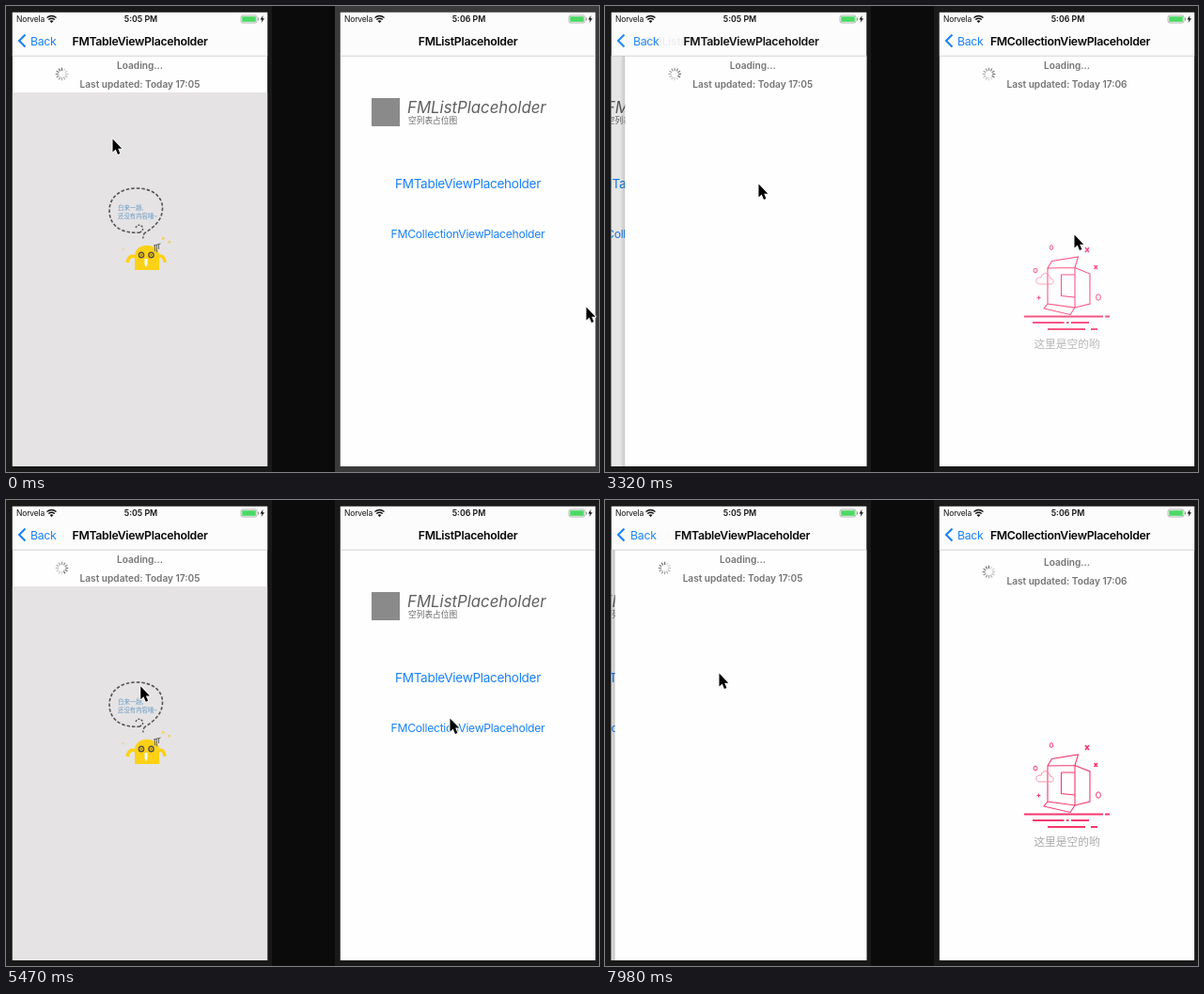
Recreate the animation shown at these times as an HTML page with a canvas. Size 631 px wide and 496 px high, loop 8 s.

```html
<!DOCTYPE html>
<html lang="en">
<head>
<meta charset="utf-8">
<title>List placeholder demo</title>
<style>
html, body { margin: 0; width: 631px; height: 496px; overflow: hidden; background: #0b0b0b; }
canvas { display: block; }
</style>
</head>
<body>
<canvas id="stage" width="631" height="496"></canvas>
<script>
const ctx = document.getElementById('stage').getContext('2d');
const LOOP = 8000, LEFT = 6.5, TOP = 6.5, WIDTH = 272, BOTTOM = 490, NAV = 53, MID = 142.5, HEADER = 39;
const BLUE = '#1a82f7', PINK = '#f5386e', PAGE = '#fefefe';
const SANS = 'Inter, sans-serif', CJK = '"Noto Sans CJK SC", "Noto Sans CJK", sans-serif';

const rowsA = 'b5e324 f58634 6f57ec b611dd 5ede85 a57890 20c8aa a481de 460008 5467c6 e9a038'.split(' ');
const rowsB = '52ec8b 6a1f62 7f2cf0 70f26a 31e46c 20204e 65bdff 958ef8 428ec8 d717e6 3fa58c'.split(' ');
const cells = '7f263b a7f5ec 67214b 214542 f3c215 4c1f6c 69386b fcff22'.split(' ');

const clamp = u => Math.max(0, Math.min(1, u));
const easeOut = u => 1 - (1 - u) ** 3;
const easeInOut = u => u < .5 ? 4 * u ** 3 : 1 - (2 - 2 * u) ** 3 / 2;

// Eased value of [time, value] keys
function track(keys, t, k = 1) {
  const i = keys.findIndex(key => key[0] > t);
  if (i === 0) return keys[0][k];
  if (i < 0) return keys[keys.length - 1][k];
  const a = keys[i - 1], b = keys[i];
  return a[k] + (b[k] - a[k]) * easeInOut((t - a[0]) / (b[0] - a[0]));
}
const latest = (steps, t) => steps.filter(s => s[0] <= t).pop()[1];

const phones = [
  {
    x: 0, time: '5:05 PM', updated: '17:05', title: 'FMTableViewPlaceholder', titleX: MID, button: 0,
    slides: [[-999, 1], [1120, 0], [3010, 1], [6800, 0], [7604, 1]],
    content: [[0, 'sad'], [400, rowsA], [3010, ''], [4200, 'sad'], [5960, rowsB], [7604, '']],
    pull: [[400, 39], [800, 0], [3009, 0], [3010, 39], [4200, 39], [4600, 0], [4880, 0], [5150, 39],
      [5960, 39], [6360, 0], [7603, 0], [7604, 39]],
    dim: [[4750, 1], [4830, .5], [4900, .5], [5150, 1]],
    cursor: [[0, 113, 141], [250, 113, 141], [950, 42, 30], [1300, 42, 30], [1660, 40, 58], [1850, 189, 433],
      [2150, 196, 478], [2500, 180, 478], [2900, 152, 190], [3320, 163, 189], [4200, 150, 195],
      [4830, 143, 200], [5300, 143, 198], [6160, 135, 188], [6650, 42, 30], [6950, 42, 30],
      [7500, 124, 185], [7980, 121, 184]]
  },
  {
    x: 349, time: '5:06 PM', updated: '17:06', title: 'FMCollectionViewPlaceholder', titleX: 146, button: 1,
    slides: [[-999, 0], [1002, 1], [4890, 0], [5772, 1]],
    content: [[0, ''], [2250, 'box'], [4100, 'grid'], [5772, ''], [6970, 'box']],
    pull: [[0, 39], [2250, 39], [2650, 0], [3000, 0], [3270, 39], [4100, 39], [4500, 0], [5771, 0], [5772, 39],
      [6970, 39], [7370, 0], [7480, 0], [7820, 52], [8100, 39]],
    dim: [[2900, 1], [2980, .5], [3150, .5], [3450, 1]],
    cursor: [[0, 617, 320], [150, 617, 320], [900, 503, 250], [1150, 503, 250], [1850, 592, 311], [2250, 590, 310],
      [2850, 499, 243], [3700, 499, 243], [4550, 375, 36], [5000, 375, 36], [5600, 476, 240],
      [6160, 472, 240], [7450, 478, 246], [7850, 480, 290]],
    hide: 7900
  }
];

function text(str, x, y, size, color, { weight = 400, align = 'center', track = 0, family = SANS, style = '' } = {}) {
  ctx.font = `${style} ${weight} ${size}px ${family}`;
  ctx.letterSpacing = track * size + 'px';
  ctx.textAlign = align;
  ctx.textBaseline = 'alphabetic';
  ctx.fillStyle = color;
  ctx.fillText(str, x, y);
}

function rect(x, y, w, h, color) {
  ctx.fillStyle = color;
  ctx.fillRect(x, y, w, h);
}

function stroke(d, color, width = 1) {
  ctx.strokeStyle = color;
  ctx.lineWidth = width;
  ctx.stroke(new Path2D(d));
}

function fill(d, color) {
  ctx.fillStyle = color;
  ctx.fill(new Path2D(d));
}

function ring(x, y, rx, ry, color, width = 1) {
  ctx.beginPath();
  ctx.ellipse(x, y, rx, ry, 0, 0, 7);
  ctx.strokeStyle = color;
  ctx.lineWidth = width;
  ctx.stroke();
}

function faded(alpha, draw) {
  ctx.save();
  ctx.globalAlpha *= alpha;
  draw();
  ctx.restore();
}

function shifted(x, y, draw) {
  ctx.save();
  ctx.translate(x, y);
  draw();
  ctx.restore();
}

function clipped(x, y, w, h, draw) {
  ctx.save();
  ctx.beginPath();
  ctx.rect(x, y, w, h);
  ctx.clip();
  draw();
  ctx.restore();
}

function home(pressed) {
  rect(LEFT, NAV, WIDTH, BOTTOM - NAV, PAGE);
  rect(40, 98, 30, 30, '#8a8a8a');
  text('FMListPlaceholder', 78, 114, 16.8, '#606060', { align: 'left', style: 'italic' });
  text('空列表占位图', 79, 125, 8.7, '#666', { align: 'left', family: CJK });
  const labels = [['FMTableViewPlaceholder', 193.5, 13.6], ['FMCollectionViewPlaceholder', 247, 12.2]];
  labels.forEach(([label, y, size], i) => faded(pressed === i ? .3 : 1, () =>
    text(label, MID, y, size, BLUE, { track: -.024 })));
}

function spinner(x, y, t) {
  const head = Math.floor(t / 83);
  for (let i = 0; i < 12; i++) {
    const a = i * Math.PI / 6, age = (head - i + 1200) % 12;
    ctx.strokeStyle = `rgba(90,90,90,${.85 - .058 * age})`;
    ctx.lineWidth = 1.3;
    ctx.beginPath();
    ctx.moveTo(x + 3.6 * Math.sin(a), y - 3.6 * Math.cos(a));
    ctx.lineTo(x + 6.8 * Math.sin(a), y - 6.8 * Math.cos(a));
    ctx.stroke();
  }
}

function header(phone, t) {
  const bold = { weight: 600 };
  text('Loading...', MID, 66.5, 10.15, '#737373', bold);
  text('Last updated: Today ' + phone.updated, MID, 86.5, 10.15, '#737373', bold);
  spinner(59.5, 72.5, t);
}

function sadFace() {
  ctx.setLineDash([3.5, 2]);
  stroke('M143 241C122 243 110 233 110 218C110 203 122 194 139 194C156 194 167 203 166.500 216C166 228 158 235 147 242', '#555', 1.6);
  ctx.setLineDash([2, 1.5]);
  stroke('M138 236Q141 231 145 235Q147 239 142 241M147 242L145.500 248', '#555', 1.4);
  ctx.setLineDash([]);
  text('白来一趟,', 119, 217, 6.4, '#6699c4', { align: 'left', family: CJK });
  text('还没有内容哦~', 119, 225.5, 6.4, '#6699c4', { align: 'left', family: CJK });
  const yellow = '#fcd116';
  stroke('M138 267Q131 264 129 273M162 267Q168 264 169 273', yellow, 3.5);
  fill('M137 281V266C137 251 163 251 163 266V281Z', yellow);
  for (const x of [144, 154.5]) {
    ring(x, 265, 2.6, 2.8, '#55503a', 1.4);
    rect(x - .7, 264.3, 1.4, 1.4, '#55503a');
  }
  fill('M147.500 269H150.500V275L149 278L147.500 275Z', '#fff');
  stroke('M158.500 254V261M160.500 254V262M162.500 253V259M157 255L164.500 253', '#666', 1);
  for (const [x, y, s] of [[166, 246, 2.5], [172.500, 250, 2.5], [124, 258, 1.5]]) rect(x, y, s, s, '#f3cf58');
}

function emptyBox() {
  stroke('M471 279L500 278.500V321L471 317ZM500 278.500L516 285V317L500 321M471 279L475.500 271.500L503.500 267L500 278.500' +
    'M485.500 286H500M485.500 286V308.500L500 310M471 317L467 322L495 328.500L500 321', PINK, 1.1);
  stroke('M462 296H475C478 295 478 290 473.500 290C473 283 465 283 464 289C458 288 457 295 462 296Z', '#f890ae', 1);
  ring(475, 257, 1.8, 2.4, PINK);
  ring(458, 281.5, 2, 2.3, PINK);
  ring(525, 310, 2.4, 3.2, PINK);
  stroke('M511 257L515 262M515 257L511 262M520.500 276L524 280M524 276L520.500 280', PINK, 1.6);
  stroke('M459.500 310.500H463.500M461.500 308.500V312.500', PINK, 1.2);
  stroke('M446 330.500H530M532 330.500H537M455 337H488.500M491 337H493.500M496 337H515M471 344H511M517 344H524', PINK, 2.2);
  text('这里是空的哟', 491.5, 364, 11.7, '#aaa', { family: CJK });
}

function list(phone, t) {
  const pull = track(phone.pull, t), body = latest(phone.content, t), top = NAV + pull;
  rect(LEFT, NAV, WIDTH, BOTTOM - NAV, PAGE);
  if (pull > 0) shifted(0, pull - HEADER, () => header(phone, t));
  if (body === 'sad') {
    rect(LEFT, top, WIDTH, BOTTOM - top, '#e5e3e4');
    faded(track(phone.dim, t), () => shifted(0, pull - HEADER, sadFace));
  } else if (body === 'box') {
    faded(track(phone.dim, t), () => shifted(-phone.x, pull - HEADER, emptyBox));
  } else if (body === 'grid') {
    cells.forEach((c, i) =>
      rect(14 + i % 2 * 132.3, top + 7.3 + (i >> 1) * 132.4, 125, 125, '#' + c));
  } else if (body) {
    body.forEach((c, i) => {
      const y = top + i * 43.55;
      rect(LEFT, y, WIDTH, 43.6, '#' + c);
      rect(LEFT + 11, y + 43, WIDTH - 11, .6, 'rgba(200,199,204,.7)');
    });
  }
}

function navBar(phone, p, backPressed) {
  rect(LEFT, TOP, WIDTH, NAV - TOP, '#fcfcfc');
  rect(LEFT, NAV - .2, WIDTH, .7, '#c4c4c6');
  const bold = { weight: 600, track: -.024 };
  faded(1 - p, () => text('FMListPlaceholder', MID - 50 * p, 41.5, 12.3, '#050505', bold));
  faded(p, () => text(phone.title, phone.titleX + 240 * (1 - p), 41.5, 12.3, '#050505', bold));
  faded(p * (backPressed ? .55 : 1), () => {
    stroke('M20.500 30.500L14 37L20.500 43.500', BLUE, 2.1);
    text('Back', 26 + 72 * (1 - p), 41.5, 12.3, BLUE, { align: 'left', track: -.024 });
  });
}

function statusBar(phone) {
  text('Norvela', 11, 17, 8.5, '#111', { align: 'left', track: -.02 });
  text(phone.time, 143.5, 17, 8.8, '#111', { weight: 600 });
  stroke('M43.500 12.500Q48.500 8.500 53.500 12.500M45.200 14.500Q48.500 12 51.800 14.500', '#111', 1.5);
  fill('M46.500 16L48.500 18L50.500 16Q48.500 14.600 46.500 16Z', '#111');
  ctx.beginPath();
  ctx.roundRect(250, 10, 17, 8, 2);
  ctx.strokeStyle = '#999';
  ctx.lineWidth = .7;
  ctx.stroke();
  rect(251.2, 11.2, 14.6, 5.6, '#4cd964');
  rect(268, 12.5, 1, 3, '#999');
  fill('M273.500 10L270.500 14.500H272.500L271.500 18L275 13.300H273Z', '#111');
}

function screen(phone, t) {
  const slide = phone.slides.filter(s => s[0] <= t).pop(), since = t - slide[0];
  const next = phone.slides.find(s => s[0] > t);
  const eased = easeOut(clamp(since / 500));
  const p = slide[1] ? eased : 1 - eased;
  const soon = next && next[0] - t < 70;
  const pressed = (slide[1] && since < 200) || (soon && next[1]) ? phone.button : -1;
  const edge = LEFT + WIDTH * (1 - p);

  clipped(LEFT, TOP, WIDTH, BOTTOM - TOP, () => {
    if (p < 1) {
      shifted(-.3 * WIDTH * p, 0, () => home(pressed));
      // keep the dimmed sheet as wide as the screen
      rect(LEFT, NAV, WIDTH, BOTTOM - NAV, `rgba(0,0,0,${.1 * p})`);
    }
    if (p > 0) {
      if (p < 1) {
        const shade = ctx.createLinearGradient(edge - 5, 0, edge, 0);
        shade.addColorStop(0, 'rgba(0,0,0,0)');
        shade.addColorStop(1, 'rgba(0,0,0,.14)');
        rect(edge - 5, NAV, 5, BOTTOM - NAV, shade);
      }
      const listTime = slide[1] ? t : Math.min(t, slide[0] + 499);
      clipped(edge, NAV, WIDTH, BOTTOM - NAV, () =>
        shifted(edge - LEFT, 0, () => list(phone, listTime)));
    }
    navBar(phone, p, soon && !next[1]);
    statusBar(phone);
  });
}

function cursor(phone, t) {
  if (t > phone.hide) return;
  shifted(track(phone.cursor, t), track(phone.cursor, t, 2), () => {
    const arrow = 'M.500 .500V14.500L3.700 11.500L6 17L8.400 16L6.200 10.700H10.300Z';
    ctx.lineJoin = 'round';
    stroke(arrow, '#fff', 1.8);
    fill(arrow, '#000');
  });
}

function draw(t) {
  rect(0, 0, 631, 496, '#0b0b0b');
  rect(0, 0, 283, 496, '#191919');
  rect(350, 0, 281, 496, t < 950 ? '#3a3a3a' : '#191919');
  for (const phone of phones) {
    shifted(phone.x, 0, () => screen(phone, t));
    cursor(phone, t);
  }
}

const start = performance.now();
function tick() {
  draw((performance.now() - start) % LOOP);
  requestAnimationFrame(tick);
}
tick();
</script>
</body>
</html>
```
